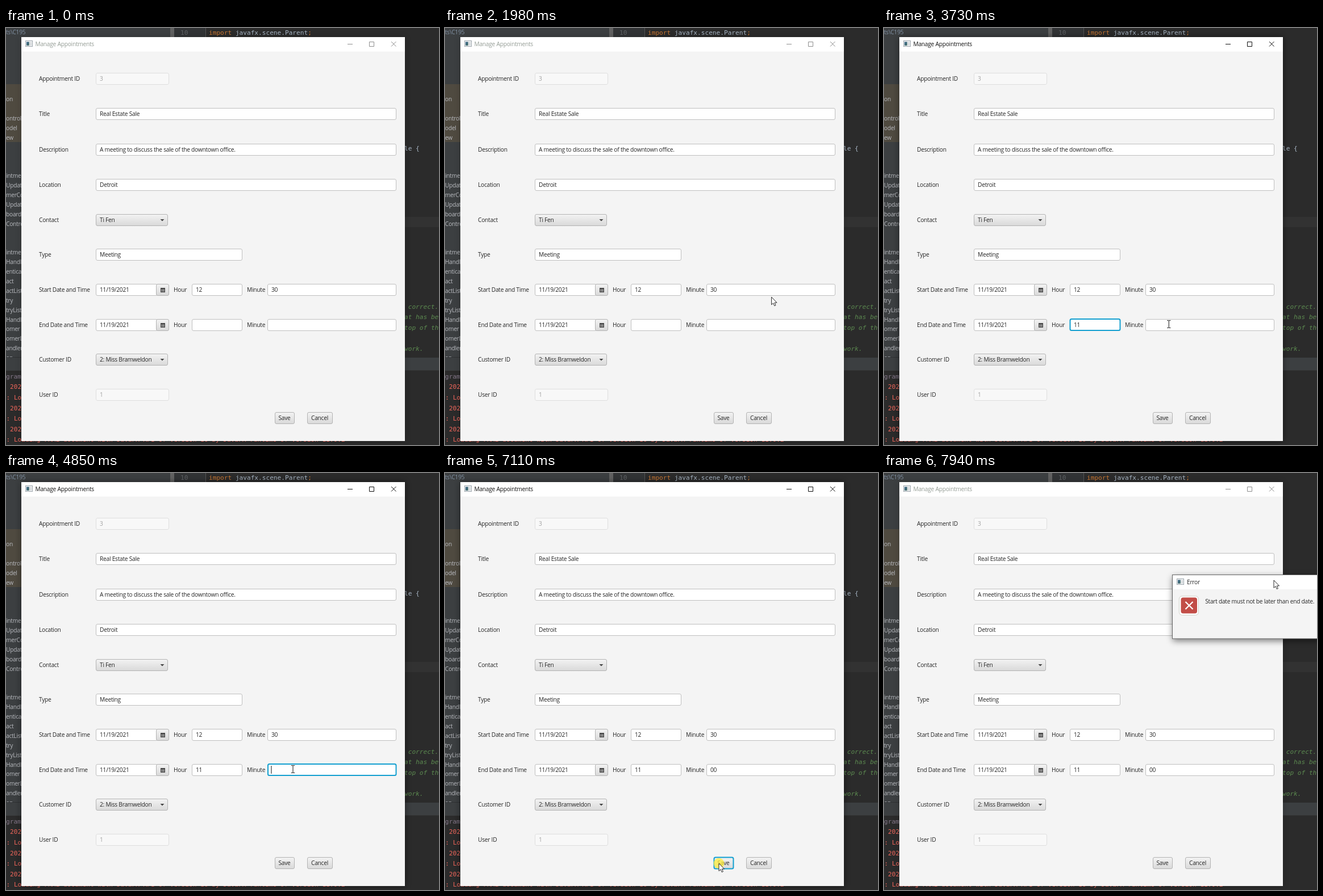
These frames come from a looping animation (762 by 735 pixels, 8 s). An HTML page:

```html
<!DOCTYPE html>
<html lang="en">
<head>
<meta charset="utf-8">
<title>Manage Appointments</title>
<style>
html, body { margin: 0; width: 100%; height: 100%; overflow: hidden; background: #2b2b2b; }
svg { display: block; }
text { font: 10.2px "Open Sans", "Noto Sans", sans-serif; letter-spacing: -.25px; fill: #262626; white-space: pre; }
.mono { font: 11.13px "DejaVu Sans Mono", monospace; letter-spacing: 0; }
.tree { fill: #b9bbc0; }
.path { fill: #8292a4; }
.line { fill: #606366; }
.run { fill: #85788a; }
.err { fill: #f2675c; }
.doc { fill: #5c8a50; font-style: italic; }
.code { fill: #a9b7c6; }
.kw { fill: #cc7832; }
</style>
</head>
<body>
<svg id="stage" width="762" height="735" viewBox="0 0 762 735">
<defs>
  <linearGradient id="btn" x2="0" y2="1"><stop stop-color="#f3f3f3"/><stop offset="1" stop-color="#d9d9d9"/></linearGradient>
  <linearGradient id="ico" x2="1" y2="1"><stop stop-color="#2f5f86"/><stop offset="1" stop-color="#5c7f74"/></linearGradient>
  <filter id="blur" x="-10%" y="-20%" width="120%" height="140%"><feGaussianBlur stdDeviation="6"/></filter>
</defs>
</svg>
<script>
const LOOP = 8000;
const stage = document.getElementById('stage');

const rect = (x, y, w, h, fill, more = '') => `<rect x="${x}" y="${y}" width="${w}" height="${h}" fill="${fill}" ${more}/>`;
const text = (x, y, s, cls = '', more = '') => `<text x="${x}" y="${y}" class="${cls}" ${more}>${s}</text>`;
const group = (id, body, more = '') => `<g id="${id}" ${more}>${body}</g>`;
const path = (d, stroke, more = '') => `<path d="${d}" fill="none" stroke="${stroke}" ${more}/>`;

const box = (x, y, w, s = '', id = '') =>
  rect(x + .5, y + .5, w - 1, 20, '#fff', 'rx="2.5" stroke="#bfbfbf"') +
  text(x + 7, y + 14.3, s, '', id && `id="${id}"`);
const button = (x, y, w, s, pad) =>
  rect(x + .5, y + .5, w - 1, 20, 'url(#btn)', 'rx="2.5" stroke="#b3b3b3"') + text(x + pad, y + 14.3, s);
const combo = (y, s) => button(158, y, 127, s, 7) + `<path d="M271.5 ${y + 9}h7l-3.5 3.5z" fill="#444"/>`;
const ring = (id, x, y, w) => rect(x, y, w, 20, 'none', `id="${id}" rx="2.5" stroke="#139fd0" stroke-width="2"`);
const appIcon = (x, y) =>
  rect(x + .5, y + .5, 12, 10, '#f5f6f7', 'stroke="#9aa3aa"') +
  rect(x + 2, y + 2.5, 5, 6.5, 'url(#ico)') + rect(x + 8, y + 2.5, 3, 6.5, '#d5d9dc');

function dateRow(y, hour, hourId, minute, minuteId) {
  const cal = rect(272, y + 7, 8, 8, '#4a4a4a') +
    path(`M273 ${y + 10.5}h6m-6 2h6M274.5 ${y + 9}v5m3 -5v5`, '#c9c9c9', 'stroke-width=".6"');
  return box(158, y, 109, '11/19/2021') + button(264, y, 23, '', 0) + cal +
    text(295, y + 14.3, 'Hour') + box(327, y, 89, hour, hourId) +
    text(424, y + 14.3, 'Minute') + box(460, y, 227, minute, minuteId);
}

function ide() {
  let s = rect(0, 0, 762, 735, '#2b2b2b') + rect(0, 0, 289, 604, '#3c3f41') +
    rect(0, 99, 28, 102, '#4f4a40') + rect(289, 0, 7, 16, '#616161') +
    rect(296, 0, 56, 16, '#313335') + rect(351, 0, 1, 16, '#555') +
    rect(701, 333, 61, 18, '#323232') + rect(701, 581, 61, 22.5, '#3c3f41');
  s += text(0, 11, 'ts\\C195', 'path') + text(307, 12, '10', 'mono line') +
    text(357, 12, '<tspan class="kw">import</tspan> javafx.scene.Parent<tspan class="kw">;</tspan>', 'mono code');
  const tree = ['on', '', 'ontrol', 'odel', 'ew', '', '', '', 'intment', 'Update', 'merCo', 'Update', 'boardC',
    'Contro', '', '', 'intmen', 'Handle', 'enticat', 'act', 'actList', 'try', 'tryList', 'Handle', 'omer', 'omerLis', 'andler', 'on'];
  tree.forEach((w, i) => s += text(0, 129.3 + i * 16.88, w, 'tree'));
  s += rect(0, 581, 28, 23, '#3c3f41') + rect(0, 580, 28, 1, '#2f3133');
  s += text(701, 216, 'le {', 'mono code');
  [[707.7, 494.5, 'correct.'], [701, 513, 'at has be'], [701, 531.5, 'top of th'], [701, 569, 'work.']]
    .forEach(d => s += text(...d, 'mono doc'));
  s += text(0, 618, 'gram', 'mono run');
  for (let i = 0; i < 6; i++) {
    const y = 636.3 + i * 18.6;
    s += i % 2 ? text(.5, y, i < 5 ? ': Load' : ': Loading FXML document with JavaFX API of version 16 by JavaFX runtime of version 11.0.2', 'mono err')
      : text(7, y, '2021', 'mono err');
  }
  return s;
}

function form() {
  const labels = ['Appointment ID', 'Title', 'Description', 'Location', 'Contact', 'Type',
    'Start Date and Time', 'End Date and Time', 'Customer ID', 'User ID'];
  const tops = [79, 141, 204, 266, 328, 389, 451, 513, 574, 636];
  let s = rect(27, 16, 675, 712, '#000', 'id="shadow" filter="url(#blur)"') +
    rect(27, 16, 675, 712, '#f4f4f4') + rect(27, 16, 675, 25.5, '#fff') +
    appIcon(34, 22) + text(51.5, 32.3, 'Manage Appointments', '', 'id="title"') +
    path('M601 28.5h9M639.5 24.5h8v8h-8zM678 24l8.5 8.5m0 -8.5l-8.5 8.5', '#000', 'id="sys"');
  labels.forEach((l, i) => s += text(58, tops[i] + 14.3, l));
  s += group('off', box(158, 79, 129, '3') + box(158, 636, 129, '1'), 'opacity=".4"');
  s += box(158, 141, 529, 'Real Estate Sale') +
    box(158, 204, 529, 'A meeting to discuss the sale of the downtown office.') +
    box(158, 266, 529, 'Detroit') + combo(328, 'Ti Fen') + box(158, 389, 258, 'Meeting') +
    dateRow(451, '12', '', '30', '') + dateRow(513, '', 'hour', '', 'minute') +
    combo(574, '2: Miss Bramweldon') +
    button(473, 677, 35, 'Save', 6.5) + button(530, 677, 45, 'Cancel', 7);
  return s + ring('ringHour', 327.5, 513, 88) + ring('ringMinute', 461, 513, 225.5) +
    ring('ringSave', 473.5, 677.5, 34) + rect(0, 516, 1, 14, '#111', 'id="caret"');
}

function dialog() {
  return rect(508, 183, 320, 113, '#000', 'filter="url(#blur)" opacity=".5"') +
    rect(507.5, 179.5, 320, 112.5, '#f4f4f4', 'stroke="#666"') + rect(508, 180, 319, 25, '#fff') +
    appIcon(515, 186) + text(533, 196, 'Error') +
    rect(519.5, 217, 34, 33.5, '#fff', 'rx="5" stroke="#d0d0c8"') +
    rect(522.5, 219.5, 28.5, 28, '#c24d47', 'rx="4"') +
    path('M530.5 227l13 13m0 -13l-13 13', '#fff', 'stroke-width="2.2"') +
    text(565.2, 230, 'Start date must not be later than end date.');
}

stage.insertAdjacentHTML('beforeend', ide() + form() + group('dialog', dialog()) +
  '<circle id="glow" r="9.3" fill="#ffee3c" opacity=".75"/>' +
  group('arrow', '<path d="M0 0V13.5L3.1 10.7L5.2 15.5L7.4 14.5L5.4 9.9H9.5Z" fill="#fff" stroke="#111" stroke-width=".9"/>') +
  group('beam', path('M-3 -6.5h2.4l.6 .6l.6 -.6H3M-3 6.5h2.4l.6 -.6l.6 .6H3M0 -6V6', '#111')));

const $ = id => document.getElementById(id);
const show = (id, on) => $(id).setAttribute('visibility', on ? 'visible' : 'hidden');
const within = (t, a, b) => t >= a && t < b;
const clamp = v => Math.max(0, Math.min(1, v));

// time, x, y of the pointer
const track = [
  [330, 655, 687], [570, 400, 610], [810, 147, 492], [1070, 147, 492], [1280, 179, 487], [1600, 420, 478], [1910, 606, 467],
  [1930, 606, 467], [2200, 440, 505], [2460, 337, 526], [3270, 337, 526], [3470, 498, 522],
  [3670, 498, 522], [3800, 505, 522], [5520, 505, 522], [5600, 508, 516], [5860, 330, 590],
  [6070, 166, 670], [6210, 205, 691], [6280, 253, 692], [6350, 290, 690],
  [6400, 290, 690], [6700, 400, 689], [7060, 482, 688], [7530, 482, 688], [7710, 570, 455], [7940, 686, 189]
];
const fields = [[158, 141, 529], [158, 204, 529], [158, 266, 529], [158, 389, 258], [158, 451, 106],
  [327, 451, 89], [460, 451, 227], [158, 513, 106], [327, 513, 89], [460, 513, 227]];

function pointer(t) {
  const i = track.findIndex(k => k[0] > t);
  if (i < 0) return track[track.length - 1].slice(1);
  if (!i) return track[0].slice(1);
  const a = track[i - 1], b = track[i], p = (t - a[0]) / (b[0] - a[0]);
  return [a[1] + (b[1] - a[1]) * p, a[2] + (b[2] - a[2]) * p];
}

function caretAt(t) {
  if (within(t, 2460, 3000)) return 334;
  if (within(t, 3130, 3200)) return 339;
  if (within(t, 3200, 3730)) return 345;
  if (within(t, 3800, 4320) || within(t, 4850, 4920)) return 466.5;
  if (within(t, 4920, 5120)) return 472;
  if (within(t, 5120, 5620) || within(t, 6120, 6620)) return 477.5;
  return 0;
}

function draw(now) {
  const t = now % LOOP;
  const active = within(t, 2460, 7310);
  $('title').style.fill = active ? '#111' : '#949c95';
  $('sys').setAttribute('stroke', active ? '#111' : '#8e8e8e');
  $('shadow').setAttribute('opacity', active ? .45 : .2);

  $('hour').textContent = '11'.slice(0, t < 3130 ? 0 : t < 3200 ? 1 : 2);
  $('minute').textContent = '00'.slice(0, t < 4920 ? 0 : t < 5120 ? 1 : 2);
  show('ringHour', within(t, 2460, 3800));
  show('ringMinute', within(t, 3800, 7110));
  show('ringSave', within(t, 7110, 7310));
  const caret = caretAt(t);
  show('caret', caret);
  $('caret').setAttribute('x', caret);

  const fade = clamp((t - 7310) / 290), k = .95 + .05 * fade;
  $('dialog').setAttribute('opacity', fade);
  $('dialog').setAttribute('transform', `translate(668 235.5) scale(${k}) translate(-668 -235.5)`);

  const [x, y] = pointer(t), place = `translate(${x.toFixed(1)} ${y.toFixed(1)})`;
  const overDialog = fade > 0 && x > 508 && y > 180 && y < 292;
  const beam = !overDialog && fields.some(f => x >= f[0] && x <= f[0] + f[2] && y >= f[1] && y <= f[1] + 21);
  const seen = t >= 330;
  show('beam', seen && beam);
  show('arrow', seen && !beam);
  show('glow', within(t, 2460, 2730) || within(t, 3800, 3990) || within(t, 7110, 7180));
  for (const id of ['beam', 'arrow', 'glow']) $(id).setAttribute('transform', place);
}

const start = performance.now();
function tick() {
  draw(performance.now() - start);
  requestAnimationFrame(tick);
}
tick();
</script>
</body>
</html>
```
